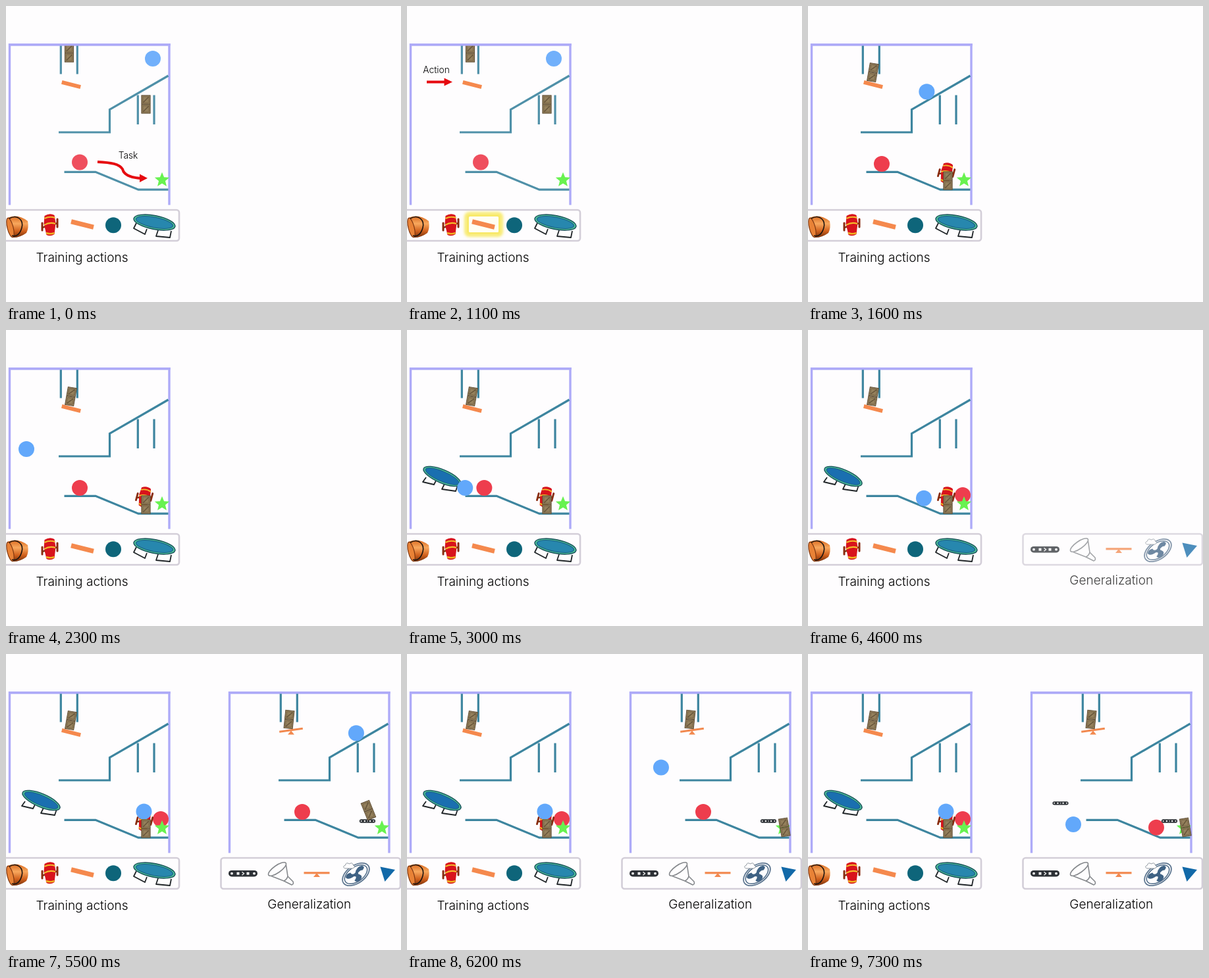
These frames come from a looping animation (600 px wide and 450 px high, 7400 ms). An HTML page:

```html
<!DOCTYPE html>
<html lang="en">
<head>
<meta charset="utf-8">
<title>Training actions and generalization</title>
<style>
  html, body { margin: 0; width: 100%; height: 100%; overflow: hidden; background: #fefdfe; }
  svg { display: block; width: 600px; height: 450px; }
  text { font-family: Inter, "Liberation Sans", sans-serif; font-weight: 300; fill: #000; text-anchor: middle; }
  .caption { font-size: 19.05px; }
  .note { font-size: 13.8px; }
  .wall { fill: none; stroke: #aeabf8; stroke-width: 3.4; }
  .ledge { fill: none; stroke: #3d859f; stroke-width: 3.2; }
  .bar { fill: #fefdfe; stroke: #d3ced8; stroke-width: 2.6; }
  .red { fill: #ee3d4d; }
  .blue { fill: #62a8fb; }
  .go { fill: none; stroke: #e60a0f; stroke-width: 4; }
  .head { fill: #e60a0f; }
  .legs { fill: none; stroke: #202528; stroke-width: 1.8; stroke-linejoin: round; }
</style>
</head>
<body>
<svg viewBox="0 0 600 450">
  <defs>
    <linearGradient id="copper" x1="0" x2="0" y1="0" y2="1">
      <stop offset="0" stop-color="#d9691f"/><stop offset=".35" stop-color="#f8a85e"/>
      <stop offset=".7" stop-color="#d0601c"/><stop offset="1" stop-color="#74300d"/>
    </linearGradient>
    <filter id="glow" x="-30%" y="-50%" width="160%" height="200%"><feGaussianBlur stdDeviation="2"/></filter>

    <g id="walls"><path class="wall" d="M5.5 302.5V58.7H248V302.5"/></g>
    <g id="ledges" class="ledge">
      <path d="M83.3 60V103.5M108.3 60V103.5M200.3 135.5V180M225 135.5V180"/>
      <path d="M80 192H157.5V157.3L246.5 106"/>
      <path d="M88.5 252.3H136L201 279.2H246.5"/>
    </g>
    <polygon id="star" fill="#68f250"/>

    <g id="crate">
      <rect x="-6.6" y="-6.6" width="13.2" height="13.2" fill="#94805c" stroke="#5d4b33"/>
      <path d="M-4.500 4.500L4.500-4.500" stroke="#66543a" stroke-width="1.500"/>
      <rect x="-4.500" y="-4.500" width="9" height="9" fill="none" stroke="#6f5d40" stroke-width=".7"/>
    </g>
    <g id="crates"><use href="#crate" y="-7"/><use href="#crate" y="7"/></g>

    <g id="bucket">
      <path d="M2 322Q18 315 33 327Q35 337 31 345Q20 353 9 352Z" fill="url(#copper)"/>
      <ellipse cx="6.500" cy="337" rx="4.500" ry="15" transform="rotate(-14 6.500 337)" fill="#e98236" stroke="#7d3610" stroke-width="1.200"/>
      <path d="M5 323C18 316 27 326 24 337S15 351 9 349" fill="none" stroke="#1d1510" stroke-width="1.600"/>
    </g>

    <g id="roller">
      <path d="M-12 4L12-3" stroke="#7a3a12" stroke-width="2.500"/>
      <path d="M-11.500-3V8M11.500-9V3" stroke="#8a2c10" stroke-width="3" stroke-linecap="round"/>
      <path d="M-8-14Q0-19 7-15L9-3L7 14Q1 18-5 15L-9-2Z" fill="#d8131c"/>
      <path d="M-8-10Q0-14 8-11M-8.500 0Q0-5 8.500-2" fill="none" stroke="#f4bd2c" stroke-width="2"/>
      <path d="M-5.500 12Q0 14.500 7 12" fill="none" stroke="#efb321" stroke-width="2.500"/>
    </g>

    <rect id="plank" x="-17.500" y="-3.500" width="35" height="7" fill="#f5894d"/>

    <g id="mat">
      <ellipse rx="32" ry="10.500" fill="#4cbd98" stroke="#174f58" stroke-width="1.400"/>
      <ellipse rx="28.500" ry="7.800" stroke="#165b82"/>
    </g>

    <g id="belt">
      <rect x="-22" y="-4.800" width="44" height="9.600" rx="4.800" fill="#2c3035"/>
      <g fill="#f3f3f3"><circle cx="-17" r="1.900"/><circle cx="17" r="1.900"/>
        <rect x="-9.500" y="-2" width="4" height="4"/><rect x="5.500" y="-2" width="4" height="4"/></g>
      <path d="M-1.500-2.500L1.500 0L-1.500 2.500" fill="none" stroke="#f3f3f3" stroke-width="1.300"/>
    </g>

    <g id="funnel" fill="#fefdfe" stroke="#85888c" stroke-width="1.600" stroke-linejoin="round">
      <path d="M-16.500 3L6.500 12L18.500 18Q22 17 20.500 13L12.500 5L9.500-15"/>
      <ellipse cx="-3.500" cy="-6" rx="16" ry="5.500" transform="rotate(-35 -3.500 -6)"/>
      <path d="M6.500 12Q11 10 12.500 5" fill="none"/>
    </g>

    <path id="pivot" d="M0 0L-5 6H5Z" fill="#f2894f"/>
    <rect id="beam" x="-19.500" y="-1.600" width="39" height="3.200" fill="#f2894f"/>

    <g id="fan">
      <g transform="rotate(-35)">
        <ellipse rx="23" ry="13.500" fill="#fefdfe" stroke="#5d7690" stroke-width="1.800"/>
        <ellipse rx="19.500" ry="11" fill="none" stroke="#4a6885" stroke-width="1.500"/>
        <g id="blades" transform="scale(1 .62)" fill="#3f6284"><circle r="4"/></g>
      </g>
      <path d="M-17-9Q-21-12-16-14Q-15-19-10-16Q-5-19-4-14Q0-11-5-9Z" fill="#fefdfe" stroke="#8f979f"/>
    </g>
    <path id="blade" d="M0-3Q7-15 15-9Q19-2 12 1Q7-4 0 3Z"/>
  </defs>

  <g id="left">
    <use href="#walls"/>
    <g id="scene">
      <use href="#ledges"/>
      <circle id="redL" class="red" r="12"/>
      <use id="rollerL" href="#roller" transform="translate(210 254) rotate(15) scale(.95)"/>
      <g id="trampolineL">
        <path class="legs" d="M29 224L24 231L41 235L45 227M57 234L53 242L74 245L77 236"/>
        <use href="#mat" fill="#1a6fb0" transform="translate(53.500 222.500) rotate(23) scale(.96)"/>
      </g>
      <circle id="blueL" class="blue" r="12"/>
    </g>
    <use href="#star" x="237" y="264.500"/>
    <use href="#plank" transform="translate(99 119.500) rotate(14.500) scale(.84)"/>
    <use id="topL" href="#crates"/>
    <use id="lowL" href="#crates"/>
    <path class="wall" d="M4 58.700H249.700"/>
  </g>

  <rect class="bar" x="-12" y="310" width="275" height="47" rx="4"/>
  <g id="glowBox">
    <rect x="90" y="316" width="53" height="32" rx="4" fill="none" stroke="#f7e858" stroke-width="5" filter="url(#glow)"/>
    <rect x="92.500" y="318.500" width="48" height="27" rx="3" fill="#fffef2" stroke="#f8e96b" stroke-width="3"/>
  </g>
  <use href="#bucket"/>
  <use href="#roller" transform="translate(66.500 333)"/>
  <use href="#plank" transform="translate(116 332) rotate(14)"/>
  <circle cx="163" cy="333.300" r="12" fill="#0e657a"/>
  <path class="legs" d="M198 330L194 338L211 347L214 339M231 341L228 350L249 352L251 342"/>
  <use href="#mat" fill="#2787ae" transform="translate(225.500 329) rotate(11)"/>
  <text class="caption" x="115.500" y="388.500">Training actions</text>

  <g id="task">
    <text class="note" x="185.500" y="232">Task</text>
    <path class="go" d="M139 237C160 238 172 240 177 248C179 257 190 261 205 262"/>
    <path class="head" d="M203 255.500L215 261.800L203 268Z"/>
  </g>
  <g id="action">
    <text class="note" x="44.500" y="102">Action</text>
    <path class="go" d="M30 115.500H58"/>
    <path class="head" d="M56.500 109.500L69 115.500L56.500 121.500Z"/>
  </g>

  <g id="tools">
    <rect class="bar" x="326.500" y="310" width="272.500" height="47" rx="4"/>
    <use href="#belt" transform="translate(360 333.700)"/>
    <use href="#funnel" transform="translate(415.500 333)"/>
    <use href="#pivot" x="472" y="333"/>
    <use href="#beam" x="472" y="332.800"/>
    <use href="#fan" transform="translate(531.500 335)"/>
    <path d="M568.500 323.500L591 328L575.500 346Z" fill="#1269a8"/>
    <text class="caption" x="460.800" y="387">Generalization</text>
  </g>

  <g id="right" transform="translate(334)">
    <use href="#walls"/>
    <use href="#ledges"/>
    <circle id="redR" class="red" r="12"/>
    <g id="placed">
      <use href="#pivot" x="99" y="116.500"/>
      <use href="#beam" transform="translate(99 115.800) rotate(-8) scale(.92)"/>
      <use href="#belt" transform="translate(215 254) scale(.55)"/>
    </g>
    <use id="beltR" href="#belt" transform="translate(49.500 226.800) scale(.55)"/>
    <circle id="blueR" class="blue" r="12"/>
    <use href="#star" x="237" y="264.500"/>
    <use id="topR" href="#crates"/>
    <use id="lowR" href="#crates"/>
    <path class="wall" d="M4 58.700H249.700"/>
  </g>
</svg>
<script>
const LOOP = 7400, STEP = 100, LEFT_START = 1100, RIGHT_START = 5100;
const $ = id => document.getElementById(id);
const clamp = (v, low = 0, high = 1) => Math.min(high, Math.max(low, v));
const mix = (a, b, p) => a + (b - a) * p;
const fade = (t, start, length) => clamp((t - start) / length);
const show = (id, on) => $(id).setAttribute("opacity", Number(on));

$("star").setAttribute("points", Array.from({ length: 10 }, (_, i) => {
  const a = (i / 5 - 0.5) * Math.PI, r = i % 2 ? 5.2 : 11.8;
  return [r * Math.cos(a), r * Math.sin(a)].map(v => v.toFixed(2));
}).join(" "));

$("blades").innerHTML += [0, 120, 240].map(a => `<use href="#blade" transform="rotate(${a})"/>`).join("");

// Height of a ball's centre while it rolls on a ledge.
const ramp = x => 106 + (223 - x) * .57;
const lower = x => 240 + (clamp(x, 138, 201) - 138) * .415;

// A body moves through phases, each starting where the last one ended.
class Body {
  constructor(x, y) {
    this.end = { x, y, angle: 0 };
    this.phases = [];
  }
  add(ms, move) {
    this.phases.push({ ms, move });
    this.end = move(1);
    return this;
  }
  wait(ms) {
    const from = this.end;
    return this.add(ms, () => from);
  }
  fall(ms, y) {
    const from = this.end;
    return this.add(ms, p => ({ ...from, y: mix(from.y, y, p * p) }));
  }
  roll(ms, x, surface, power) {
    const from = this.end;
    return this.add(ms, p => {
      const at = mix(from.x, x, p ** power);
      return { x: at, y: surface(at), angle: 0 };
    });
  }
  hop(ms, x, y, rise = 0, angle = 0) {
    const from = this.end;
    return this.add(ms, p => ({
      x: mix(from.x, x, p),
      y: mix(from.y, y, p) - 4 * rise * p * (1 - p),
      angle: mix(from.angle, angle, p)
    }));
  }
  at(s) {
    for (const { ms, move } of this.phases) {
      if (s < ms) return move(s / ms);
      s -= ms;
    }
    return this.end;
  }
}

const ball = () => new Body(223, 80).fall(165, 106).roll(475, 151, ramp, 1.5)
  .hop(240, 98, 180, 4).hop(320, 31, 181, 9.5);
const topCrates = () => new Body(96, 71.5).fall(200, 98);
const lowCrates = () => new Body(212.5, 149.5);

const leftBodies = {
  blueL: ball().hop(90, 28, 199).hop(260, 38, 203, 8).hop(300, 88, 240, 5)
    .roll(1800, 190, lower, 1.7).hop(250, 209.5, 239.5, 6),
  redL: new Body(112, 237.5).fall(60, 240).wait(1790).roll(400, 192, lower, 1.3)
    .hop(350, 218, 240, 12).hop(250, 235, 251, 5),
  topL: topCrates().hop(300, 98.5, 101, 0, 10),
  lowL: lowCrates().fall(450, 265.5)
};
const rightBodies = {
  blueR: ball().hop(200, 36, 214).hop(350, 92, 240, 14).hop(450, 69, 259, 5),
  redR: new Body(116, 240).wait(1700).roll(500, 195, lower, 1.3),
  topR: topCrates().hop(200, 96, 99.5, 0, 6),
  lowR: lowCrates().fall(330, 236).hop(70, 216.5, 237.5, 0, -22).hop(300, 239.3, 263.5, 0, -10)
};

function place(bodies, s) {
  for (const [id, body] of Object.entries(bodies)) {
    const { x, y, angle } = body.at(Math.max(0, s));
    $(id).setAttribute("transform", `translate(${x} ${y}) rotate(${angle})`);
  }
}

function draw(t) {
  place(leftBodies, t - LEFT_START);
  place(rightBodies, t - RIGHT_START);
  const hint = fade(t, 400, 300) * (t <= LEFT_START);
  show("scene", t > LEFT_START ? 1 : .9);
  show("task", 1 - fade(t, 200, 300));
  show("action", hint);
  show("glowBox", hint);
  show("rollerL", t >= 1300);
  show("trampolineL", t >= 2400);
  show("tools", fade(t, 4300, 400));
  show("right", t >= 5000);
  show("placed", t >= RIGHT_START);
  show("beltR", t >= 6300);
}

const origin = performance.now();
function tick() {
  const t = (performance.now() - origin) % LOOP;
  draw(Math.floor(t / STEP) * STEP);
  requestAnimationFrame(tick);
}
draw(0);
requestAnimationFrame(tick);
</script>
</body>
</html>
```
